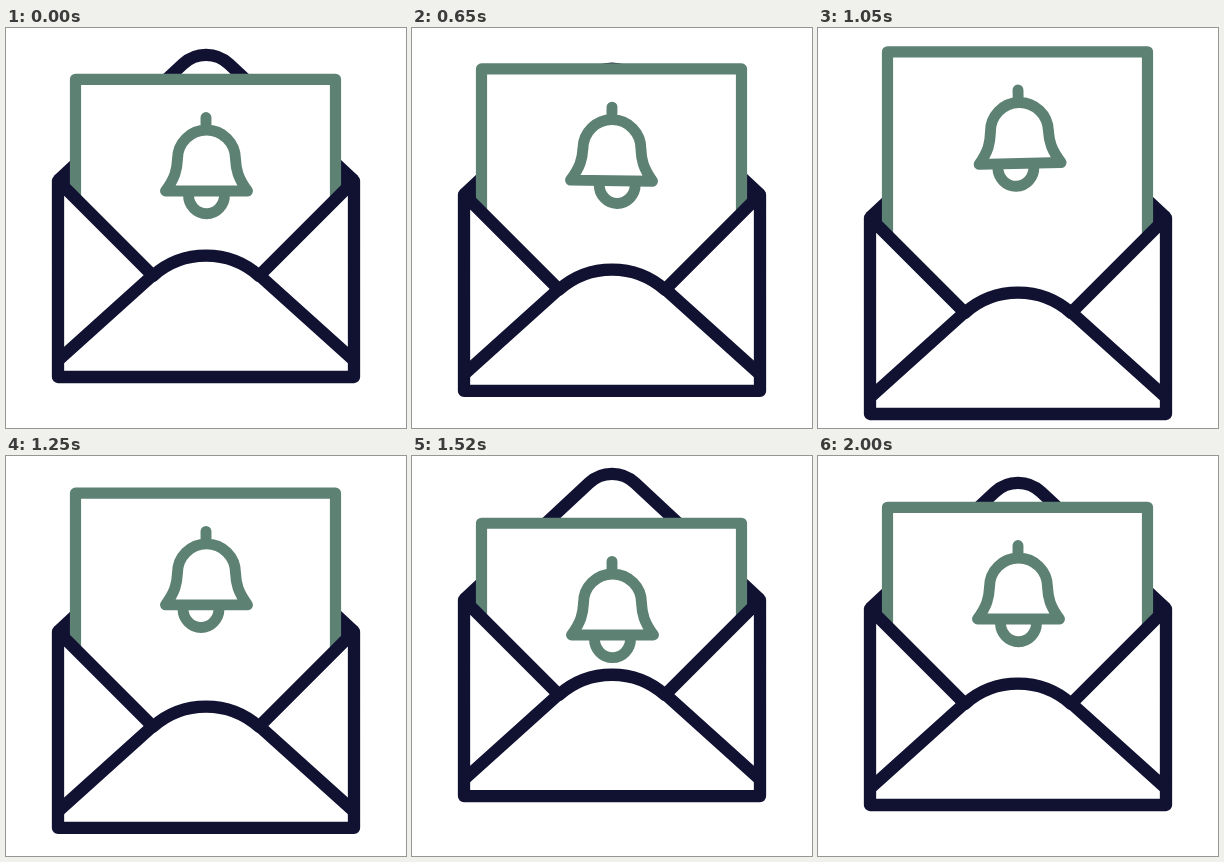
Write an HTML page that moves like this. It is 400x400 px and loops after 2020 ms.

```html
<!DOCTYPE html>
<html lang="en">
<head>
<meta charset="utf-8">
<title>Envelope with bell</title>
<style>
  html, body { margin: 0; height: 100%; overflow: hidden; background: #fff; }
  svg { display: block; width: 100vw; height: 100vh; }
  .navy { stroke: #111132; stroke-width: 12.3; }
  .green { stroke: #5d8172; stroke-width: 11.2; }
  .bell { stroke-width: 10.9; }
</style>
</head>
<body>
<svg viewBox="0 0 400 400" fill="none" stroke-linejoin="round">
  <g id="flap" class="navy">
    <path d="M52 152.5 L177 36 A33.5 33.5 0 0 1 223 36 L348 152.5"/>
    <path fill="#111132" stroke="none" d="M52 152.5 L72 134 V172 Z M348 152.5 L328 134 V172 Z"/>
  </g>
  <g id="letter" class="green">
    <rect x="69.5" y="51.3" width="260" height="258" fill="#fff"/>
    <g id="bell" class="bell">
      <path id="clapper" d="M182.5 165 V167 a18 18.7 0 0 0 36 0 V165"/>
      <path stroke-linecap="round" d="M200 89.5 V100 M159.5 163 C169 150 171 142 171.5 131
        A29 29 0 0 1 229.5 131 C230 142 232 150 241.5 163 Z"/>
    </g>
  </g>
  <g id="front" class="navy">
    <path fill="#fff" d="M52 152.8 L147 247.8 A80 80 0 0 1 253 247.8 L348 152.8 V349 H52 Z"/>
    <path d="M52 332.5 L147 247 M348 332.5 L253 247"/>
  </g>
</svg>
<script>
const LOOP = 2020;
const smooth = u => u * u * (3 - 2 * u);
const cubic = u => u < 0.5 ? 4 * u ** 3 : 1 - 4 * (1 - u) ** 3;
const quickCubic = u => cubic(u ** 0.604);

// Keys are [time, value, easing towards this key]
function at(keys, t) {
  if (t <= keys[0][0]) return keys[0][1];
  for (let i = 1; i < keys.length; i++) {
    const [t0, v0] = keys[i - 1], [t1, v1, ease = smooth] = keys[i];
    if (t < t1) return v0 + (v1 - v0) * ease((t - t0) / (t1 - t0));
  }
  return keys[keys.length - 1][1];
}

const travel = (first, second) => [
  [510, 0], [1030, first, quickCubic], [1550, second, cubic], [2000, 0, cubic]
];
const envelopeY = travel(37, -9);
const letterY = travel(-27.5, 16);
const bellAngle = [[520, 0], [590, 4], [730, -4], [870, 4], [1010, -2], [1150, 1.5], [1240, 0]];
const clapperX = [[500, 0], [640, 6], [780, -9], [920, 7], [1060, -4.5], [1160, 4],
  [1250, -5.5], [1400, 2], [1520, 0]];

const move = (id, value) =>
  document.getElementById(id).setAttribute('transform', value);

function draw(now) {
  const t = now % LOOP;
  const envelope = `translate(0 ${at(envelopeY, t)})`;
  move('flap', envelope);
  move('front', envelope);
  move('letter', `translate(0 ${at(letterY, t)})`);
  move('bell', `rotate(${at(bellAngle, t)} 200 90)`);
  move('clapper', `translate(${at(clapperX, t)} 0)`);
}

const start = performance.now();
function tick() {
  draw(performance.now() - start);
  requestAnimationFrame(tick);
}
tick();
</script>
</body>
</html>
```
